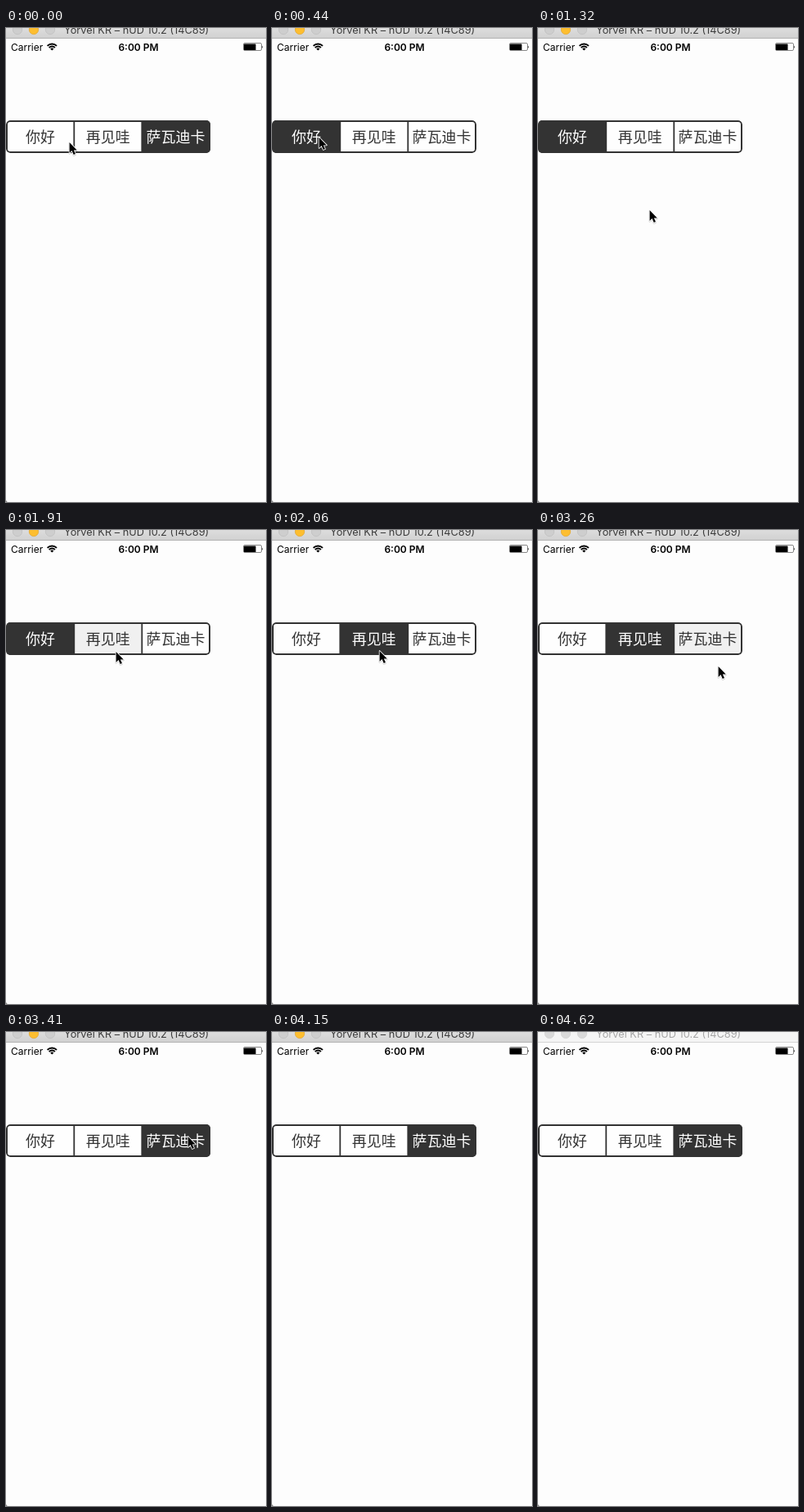
An HTML page for the animation above (4720 ms loop, 318x580 px).

```html
<!DOCTYPE html>
<html lang="en">
<head>
<meta charset="utf-8">
<title>Segmented control</title>
<style>
  html, body { margin: 0; width: 100%; height: 100%; overflow: hidden; background: #fdfdfd; }
  svg { display: block; }
  text { font-family: Inter, Roboto, sans-serif; }
  .label { font: 18px "Noto Sans CJK SC", "Noto Sans CJK", sans-serif; text-anchor: middle; }
</style>
</head>
<body>
<svg width="318" height="580" viewBox="0 0 318 580">
  <defs>
    <linearGradient id="chrome" x1="0" y1="0" x2="0" y2="1">
      <stop offset="0" stop-color="#dddddd"/>
      <stop offset="1" stop-color="#d1d1d1"/>
    </linearGradient>
    <clipPath id="round"><rect y="113" width="250" height="40" rx="5"/></clipPath>
    <path id="arrow" d="M0 0V14L3.2 11L5.6 16.3L8 15.3L5.7 10.2H10Z"/>
  </defs>
  <rect width="318" height="580" fill="#fdfdfd"/>

  <rect id="bar" width="318" height="12"/>
  <rect id="edge" y="12" width="318" height="1"/>
  <g id="lights" stroke-width=".7"></g>
  <text id="title" x="71" y="7" font-size="12.75">Yorvel KR – nUD 10.2 (14C89)</text>

  <text x="6" y="27.5" font-size="12">Carrier</text>
  <g id="wifi" transform="translate(56.3 27.6)" fill="none" stroke="#000" stroke-width="1.9"></g>
  <text x="162" y="27.5" font-size="12" font-weight="600" text-anchor="middle">6:00 PM</text>
  <rect x="290.5" y="18.5" width="22" height="9" rx="1.5" fill="none" stroke="#888"/>
  <rect x="291" y="19.5" width="14.5" height="7.5" rx=".5"/>
  <path d="M313.3 21.5Q315 23 313.3 25Z"/>

  <g clip-path="url(#round)">
    <g id="control"></g>
    <rect x="1" y="114" width="248" height="38" rx="4" fill="none" stroke="#333" stroke-width="2"/>
  </g>
  <path d="M0 577.5Q.4 579.6 2 580H0Z" fill="#777"/>

  <g id="cursor">
    <g transform="translate(.6 1) scale(.92)" stroke-linejoin="round">
      <use href="#arrow" y="1" stroke="#000" stroke-width="2.4" opacity=".14"/>
      <use href="#arrow" stroke="#fff" stroke-width="1.8"/>
      <use href="#arrow"/>
    </g>
  </g>
</svg>
<script>
const LOOP = 4720, STEP = 148, EXIT_AT = 4150, BLUR_AT = 4620;
const DARK = '#333', LIGHT = '#fefefe', PRESSED = '#f0f0f0';
const $ = id => document.getElementById(id);

// Where the pointer turns or rests
const stops = [
  { at: 0, x: 77, y: 139 },
  { at: 440, x: 57, y: 133 },
  { at: 1320, x: 136, y: 222 },
  { at: 1910, x: 134, y: 148 },
  { at: 2060, x: 131, y: 147 },
  { at: 2210, x: 131, y: 147 },
  { at: 2660, x: 219, y: 142 },
  { at: 2960, x: 218, y: 205 },
  { at: 3110, x: 218, y: 205 },
  { at: 3410, x: 222, y: 127 },
  { at: 3550, x: 222, y: 127 },
  { at: 4000, x: 279, y: 553 }
];

const clicks = [
  { segment: 0, down: 290, up: 440 },
  { segment: 1, down: 1910, up: 2060 },
  { segment: 2, down: 2660, up: 3410 }
];

function set(node, attrs) {
  for (const key in attrs) node.setAttribute(key, attrs[key]);
  return node;
}

function add(parent, tag, attrs, text = '') {
  const node = set(document.createElementNS('http://www.w3.org/2000/svg', tag), attrs);
  node.textContent = text;
  return parent.appendChild(node);
}

const lights = [0, 1, 2].map(i => add($('lights'), 'circle', { cx: 14 + 20 * i, cy: 2, r: 5.7 }));

for (const r of [8.1, 5.1]) {
  const d = r * Math.SQRT1_2;
  add($('wifi'), 'path', { d: `M${-d} ${-d}A${r} ${r} 0 0 1 ${d} ${-d}` });
}
add($('wifi'), 'path', { d: 'M0 0L-2.1 -2.1A3 3 0 0 1 2.1 -2.1Z', fill: '#000', stroke: 'none' });

const segments = ['你好', '再见哇', '萨瓦迪卡'].map((word, i) => ({
  face: add($('control'), 'rect', { x: 83 * i + .4, y: 113, width: 84, height: 40 }),
  label: add($('control'), 'text', { class: 'label', x: 42 + 82.8 * i, y: 139.8 }, word)
}));
for (const x of [82.4, 165.4]) {
  add($('control'), 'rect', { x, y: 113, width: 1.8, height: 40, fill: DARK });
}

const smooth = u => u * u * (3 - 2 * u);

// Eases from stop to stop, held between evenly spaced ticks
function pointerAt(t) {
  const next = stops.findIndex(stop => stop.at > t);
  if (next < 0) return stops[stops.length - 1];
  const a = stops[next - 1], b = stops[next], span = b.at - a.at;
  const ticks = Math.round(span / STEP);
  const u = smooth(Math.floor((t - a.at) / span * ticks) / ticks);
  return { x: a.x + (b.x - a.x) * u, y: a.y + (b.y - a.y) * u };
}

function drawWindow(active) {
  set($('bar'), { fill: active ? 'url(#chrome)' : '#f5f5f5' });
  set($('edge'), { fill: active ? '#b2b2b2' : '#d3d3d3' });
  set($('title'), { fill: active ? '#3c3c3c' : '#a6a6a6' });
  set($('lights'), { fill: active ? '#cecece' : '#d9d9d9', stroke: active ? '#bebebe' : '#d0d0d0' });
  set(lights[1], { fill: active ? '#fdbe30' : 'inherit', stroke: active ? '#e2a52c' : 'inherit' });
}

function drawControl(t) {
  const done = clicks.filter(click => click.up <= t).pop() || clicks[2];
  const held = clicks.find(click => click.down <= t && t < click.up);
  segments.forEach(({ face, label }, i) => {
    const selected = i === done.segment;
    const pressed = held && i === held.segment;
    set(face, { fill: selected ? DARK : pressed ? PRESSED : LIGHT });
    set(label, { fill: selected ? '#fff' : DARK });
  });
}

function draw(t) {
  drawWindow(t < BLUR_AT);
  drawControl(t);
  const { x, y } = pointerAt(t);
  set($('cursor'), {
    transform: `translate(${x} ${y})`,
    visibility: t < EXIT_AT ? 'visible' : 'hidden'
  });
}

const start = performance.now();
function tick() {
  draw((performance.now() - start) % LOOP);
  requestAnimationFrame(tick);
}
tick();
</script>
</body>
</html>
```
